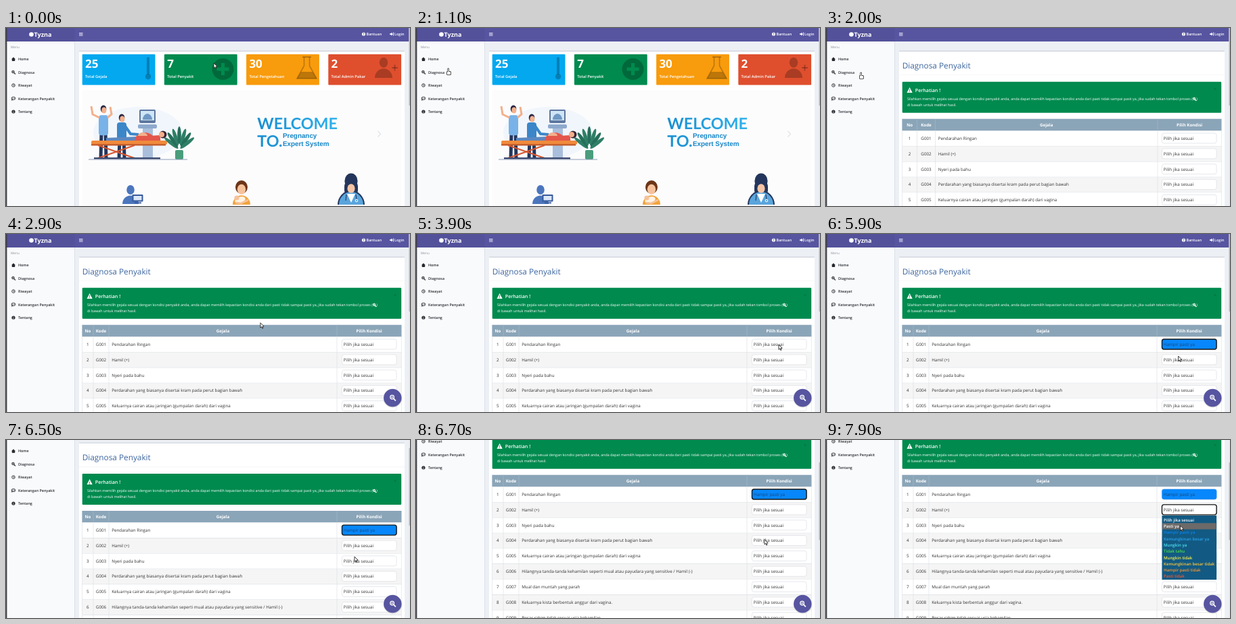
These frames come from a looping animation (597x264 px, 8 s). An HTML page with a canvas:

```html
<!DOCTYPE html>
<html lang="id">
<head>
<meta charset="utf-8">
<title>Diagnosa Penyakit</title>
<style>
  html, body { margin: 0; width: 597px; height: 264px; overflow: hidden; background: #ecf0f5; }
  canvas { display: block; }
</style>
</head>
<body>
<canvas id="stage" width="597" height="264"></canvas>
<script>
const ctx = document.getElementById('stage').getContext('2d');
const LOOP = 8000, STEP = 100;
const PURPLE = '#5755a0', GREEN = '#008a4e', SKIN = '#f3b08c', NAVY = '#24365c', BLUE = '#4b76bd';
const LEFT = 112.7, WIDTH = 471.5, RIGHT = LEFT + WIDTH, ROW = 22.85, OPTION = 9.3;

// moments of the story, in ms
const PAGE = 2000, SETTLED = 2200, OPEN_1 = 4200, PICK = 5600, SCROLL = 6200, SCROLLED = 6700, OPEN_2 = 7300;

const symptoms = [
  'Pendarahan Ringan', 'Hamil (+)', 'Nyeri pada bahu',
  'Perdarahan yang biasanya disertai kram pada perut bagian bawah',
  'Keluarnya cairan atau jaringan (gumpalan darah) dari vagina',
  'Hilangnya tanda-tanda kehamilan seperti mual atau payudara yang sensitive / Hamil (-)',
  'Mual dan muntah yang parah', 'Keluarnya kista berbentuk anggur dari vagina.',
  'Besar rahim tidak sesuai usia kehamilan'
];
const options = [
  ['Pilih jika sesuai', '#fff'], ['Pasti ya', '#a07af0'], ['Hampir pasti ya', '#0a84f0'],
  ['Kemungkinan besar ya', '#2ba3ec'], ['Mungkin ya', '#4fe3f2'], ['Tidak tahu', '#4ee04e'],
  ['Mungkin tidak', '#fff04a'], ['Kemungkinan besar tidak', '#ffc63a'],
  ['Hampir pasti tidak', '#ff952e'], ['Pasti tidak', '#f4562e']
];
// pointer moves: start, end, x, y
const moves = [
  [0, 1100, 47, 60], [1300, 1800, 51, 66], [2100, 3400, 536, 164], [OPEN_1, 5000, 532, 205],
  [5000, 5400, 531, 196], [PICK, 6100, 515, 173], [6500, SCROLLED, 515, 147.5],
  [SCROLLED, 7100, 520, 101], [OPEN_2, 7900, 523.5, 127]
];

const progress = (t, start, end) => Math.min(1, Math.max(0, (t - start) / (end - start)));
const smooth = p => p * p * (3 - 2 * p);
const scrollAt = t => 83 * progress(t, SCROLL, SCROLLED) ** 2;

function pointerAt(t) {
  let x = 307, y = 52;
  for (const [start, end, toX, toY] of moves) {
    const p = smooth(progress(t, start, end));
    x += (toX - x) * p;
    y += (toY - y) * p;
  }
  return [x, y];
}

function rect(x, y, w, h, fill, radius = 0) {
  ctx.fillStyle = fill;
  ctx.beginPath();
  ctx.roundRect(x, y, w, h, radius);
  ctx.fill();
}
function disc(x, y, r, fill, ry = r, tilt = 0) {
  ctx.fillStyle = fill;
  ctx.beginPath();
  ctx.ellipse(x, y, r, ry, tilt, 0, 7);
  ctx.fill();
}
function dome(x, base, rx, ry, fill) {
  ctx.fillStyle = fill;
  ctx.beginPath();
  ctx.ellipse(x, base, rx, ry, 0, Math.PI, 0);
  ctx.fill();
}
function ring(x, y, r, color, width) {
  ctx.strokeStyle = color;
  ctx.lineWidth = width;
  ctx.beginPath();
  ctx.arc(x, y, r, 0, 7);
  ctx.stroke();
}
function trace(points) {
  ctx.beginPath();
  for (let i = 0; i < points.length; i += 2) ctx.lineTo(points[i], points[i + 1]);
}
function poly(fill, ...points) {
  trace(points);
  ctx.fillStyle = fill;
  ctx.fill();
}
function line(color, width, ...points) {
  trace(points);
  ctx.strokeStyle = color;
  ctx.lineWidth = width;
  ctx.stroke();
}
function text(s, x, y, size, fill, weight = 400, align = 'left', family = '"Open Sans", sans-serif') {
  ctx.font = `${weight} ${size}px ${family}`;
  ctx.textAlign = align;
  ctx.fillStyle = fill;
  ctx.fillText(s, x, y);
}
function plus(x, y, r, color, width) {
  line(color, width, x - r, y, x + r, y);
  line(color, width, x, y - r, x, y + r);
}
function magnifier(x, y, r, color, width) {
  ring(x, y, r, color, width);
  line(color, width * 1.3, x + r * .75, y + r * .75, x + r * 1.9, y + r * 1.9);
  plus(x, y, r / 2, color, width * .7);
}
function bust(x, base, size, coat, skin) {
  dome(x, base, size, size * 1.05, coat);
  disc(x, base - size * 1.75, size * .48, skin, size * .58);
}

function header() {
  rect(0, 0, 597, 20, PURPLE);
  rect(0, 0, 101.5, 20, '#53519a');
  disc(37.5, 9.5, 3.3, '#fff');
  text('Tyzna', 41.5, 12.5, 9, '#fff', 700);
  for (let i = 0; i < 3; i++) rect(108, 7 + i * 1.8, 5.5, 1, '#dddcf0');
  disc(528.5, 9, 2.6, '#fff');
  text('?', 528.5, 10.8, 5, PURPLE, 700, 'center');
  text('Bantuan', 532.5, 11.2, 5.5, '#fff', 600);
  rect(567, 8.2, 3, 1.6, '#fff');
  poly('#fff', 569, 6.5, 571.6, 9, 569, 11.5);
  rect(571.8, 6.6, 1, 4.8, '#fff');
  text('Login', 574, 11.2, 5.5, '#fff', 600);
}

function sidebar() {
  rect(0, 20, 101.5, 400, '#f9fafc');
  rect(101, 20, .7, 400, '#d2d6de');
  text('Menu', 7, 30.2, 4.8, '#8a8f96');
  const ink = '#262a2e';
  ['Home', 'Diagnosa', 'Riwayat', 'Keterangan Penyakit', 'Tentang'].forEach((label, i) =>
    text(label, 18, 48 + i * 19.5, 5.4, ink, 600));
  poly(ink, 8, 46.3, 11, 43.3, 14, 46.3);
  rect(8.8, 46, 4.4, 3, ink);
  magnifier(10.5, 65, 1.8, ink, 1);
  ring(11, 85, 2.3, ink, .9);
  line(ink, .7, 11, 83.5, 11, 85.3, 12.2, 85.3);
  disc(11, 104.3, 3.1, ink, 2.5);
  poly(ink, 8.6, 105, 8.3, 108, 11, 106);
  disc(11, 104.3, 2.3, '#f9fafc', 1.7);
  for (let i = -1; i < 2; i++) disc(11 + i * 1.3, 104.3, .5, ink);
  disc(11, 124, 2.6, ink);
  text('i', 11, 125.8, 4.6, '#fff', 700, 'center');
}

function cards() {
  const shade = 'rgba(0,0,0,.24)';
  [['25', 'Total Gejala', '#03a8ef'], ['7', 'Total Penyakit', GREEN],
   ['30', 'Total Pengetahuan', '#f89b0c'], ['2', 'Total Admin Pakar', '#df4f2e']]
    .forEach(([count, label, color], i) => {
      const x = LEFT + i * 121.2;
      rect(x, 39, 107.8, 45.6, color, 1);
      text(count, x + 4.3, 58.9, 17, '#fff', 700);
      text(label, x + 4.3, 73.6, 5.75, '#fff', 600);
    });
  rect(208, 43, 4, 26, shade, 2);
  disc(210, 72, 4.2, shade);
  disc(320.5, 61, 16, shade);
  plus(320.5, 61, 9, GREEN, 5);
  rect(438, 42, 13, 2, shade);
  line(shade, 1.6, 440.5, 43, 440.5, 56, 430, 75, 459, 75, 448.5, 56, 448.5, 43);
  poly(shade, 436, 65, 453, 65, 459, 75, 430, 75);
  bust(558, 74, 13, shade, shade);
  plus(574.5, 59, 4.5, shade, 2);
}

function standing(x, top, height, shirt, trousers) {
  const hip = top + height * .5;
  line(trousers, 5, x - 3, hip, x - 4, top + height);
  line(trousers, 5, x + 3, hip, x + 4, top + height);
  rect(x - 7, top + height * .18, 14, height * .38, shirt, 4);
  disc(x, top + 5, 4.3, '#2b2745', 5.5);
  disc(x + .8, top + 7, 3.5, SKIN, 4.5);
}

function clinic() {
  disc(195, 155, 66, '#f1f6fc', 38);
  // examination machine
  rect(197, 121, 24, 20, '#5d779f', 2);
  rect(199, 123, 20, 14, '#cfe5f5');
  dome(209, 136, 7, 9, '#6f98c4');
  rect(195, 143, 28, 6, '#8ea9cd', 2);
  rect(202, 149, 15, 45, '#a9bedb');
  // visitor and doctor
  standing(144, 115, 79, '#78b2e8', NAVY);
  line(SKIN, 3, 138, 133, 128, 128, 126, 116);
  line(SKIN, 3, 150, 133, 156, 128, 154, 117);
  standing(171, 128, 66, '#3b86c8', NAVY);
  line('#3b86c8', 4, 175, 144, 184, 157, 196, 158);
  // patient
  line('#5c88c0', 6, 148, 166, 196, 164);
  dome(205, 168, 15, 13, '#e4574b');
  dome(202, 160, 7, 5, SKIN);
  line('#e4574b', 8, 210, 164, 228, 163);
  disc(232, 158, 5.5, '#3a2335');
  disc(230, 158, 4, SKIN);
  // bed
  rect(126, 167, 112, 6, '#f08a3c', 2);
  rect(126, 172, 110, 2.4, '#c55f2c');
  line('#d8562f', 2, 136, 174, 190, 193);
  line('#d8562f', 2, 190, 174, 136, 193);
  rect(130, 192, 98, 2.5, '#38486e');
  // plant
  for (let i = -3; i <= 3; i++) {
    const a = i * .3, reach = 21 - Math.abs(i) * 2;
    disc(256 + reach * Math.sin(a), 180 - reach * Math.cos(a), 2.8, i % 2 ? '#2e7f66' : '#256e5a', 13, a);
  }
  rect(250, 181, 12, 14, '#4a9d7c', 2);
  rect(122, 194.6, 146, .8, '#8f9bb5');
}

function roleIcons() {
  const base = 262;
  // administrator with screen
  bust(184, base - 1, 12, BLUE, BLUE);
  rect(186.5, 247, 16, 10.5, '#35599c', 1);
  rect(188.5, 249, 12, 6.5, '#dbe7f8');
  rect(190, 258.5, 10, 1.8, '#35599c');
  // mother and child
  disc(348, 236, 9, '#6c3518', 10);
  bust(348, base, 13, '#f2a33a', '#f6c29b');
  disc(346, 255, 8, '#fff4e4', 4.5, -.3);
  disc(341, 252, 3.6, '#f6c29b');
  line('#f6c29b', 3, 358, 255, 347, 260, 339, 259);
  // doctor with stethoscope
  rect(500, 226, 20, 24, NAVY, 9);
  bust(510, base, 20, NAVY, NAVY);
  bust(510, base, 18, '#5aa5dc', NAVY);
  disc(510, 238, 5.6, '#f4c4a4', 6.8);
  poly('#fff', 504, 246, 516, 246, 510, 259);
  line(NAVY, 1.1, 503, 247, 502, 256);
  line(NAVY, 1.1, 517, 247, 518, 254);
  ring(518, 256, 1.8, '#fff', 1);
}

function home() {
  cards();
  rect(LEFT, 92, WIDTH, 172, '#fcfcfd');
  clinic();
  const sky = ctx.createLinearGradient(372, 0, 488, 0);
  sky.addColorStop(0, '#1b8fd0');
  sky.addColorStop(1, '#2fb0ea');
  const slogan = (s, x, y, size, fill, family) => text(s, x, y, size, fill, 700, 'left', family);
  slogan('WELCOME', 371.3, 149.8, 23.3, sky, 'Lato, sans-serif');
  slogan('TO.', 371.3, 176.3, 23.3, sky, 'Lato, sans-serif');
  slogan('Pregnancy', 409, 163, 9.85, '#1787c8', '"Liberation Sans", sans-serif');
  slogan('Expert System', 409, 174.7, 9.85, '#1787c8', '"Liberation Sans", sans-serif');
  line('#dfe3e8', 1.2, 549.5, 153, 553.5, 157.3, 549.5, 161.5);
  roleIcons();
}

const rowCenter = i => 163.5 + i * ROW;

function selectBox(i, chosen, focused) {
  const y = rowCenter(i);
  rect(496.5, y - 7.5, 80.6, 15, chosen ? '#0787fb' : '#fff', 3);
  ctx.strokeStyle = focused ? '#151515' : chosen ? '#3a91e4' : '#dcdfe4';
  ctx.lineWidth = focused ? 1.4 : .7;
  ctx.stroke();
  text(chosen ? 'Hampir pasti ya' : 'Pilih jika sesuai', 498.8, y + 2.3, 6.3, chosen ? '#1c4672' : '#333');
}

function notice() {
  rect(LEFT, 79.8, WIDTH, 46, GREEN, 1.2);
  poly('#fff', 119.5, 96, 123.6, 88, 127.7, 96);
  text('!', 123.6, 95.4, 6, GREEN, 700, 'center');
  text('Perhatian !', 131.8, 95, 7.1, '#fff', 600);
  text('×', 575, 92.5, 7, '#007340', 700, 'center');
  const advice = 'Silahkan memilih gejala sesuai dengan kondisi penyakit anda, anda dapat memilih kepastian ' +
    'kondisi anda dari pasti tidak sampai pasti ya, jika sudah tekan tombol proses (';
  text(advice, 120, 107.3, 5.32, '#fff');
  const end = 120 + ctx.measureText(advice).width;
  magnifier(end + 2.3, 104.8, 1.7, '#fff', 1);
  text(')', end + 5.4, 107.3, 5.32, '#fff');
  text('di bawah untuk melihat hasil.', 120, 116.3, 5.32, '#fff');
}

function diagnosis(t) {
  text('Diagnosa Penyakit', LEFT, 59.8, 11.8, '#3c659f');
  rect(108, 69.5, 481, .6, '#f0f1f3');
  notice();

  const inner = t < SETTLED ? [134.5, 161.5, 490] : [129, 152, 489];
  const columns = [LEFT, ...inner, RIGHT];
  const middle = i => (columns[i] + columns[i + 1]) / 2;
  rect(LEFT, 134.8, WIDTH, 17.3, '#8ba5b8');
  ['No', 'Kode', 'Gejala', 'Pilih Kondisi'].forEach((label, i) =>
    text(label, middle(i), 145.8, 6.2, '#fff', 700, 'center'));
  const focus = t < OPEN_1 ? -1 : t < OPEN_2 ? 0 : 1;
  symptoms.forEach((symptom, i) => {
    const y = rowCenter(i);
    rect(LEFT, y - ROW / 2, WIDTH, ROW, i % 2 ? '#f5f5f5' : '#fff');
    rect(LEFT, y - ROW / 2, WIDTH, .6, '#dde1e6');
    text(i + 1, middle(0), y + 2.3, 6.25, '#333', 400, 'center');
    text('G00' + (i + 1), middle(1), y + 2.3, 6.25, '#333', 400, 'center');
    text(symptom, columns[2] + 4.2, y + 2.3, 6.25, '#333');
    selectBox(i, i === 0 && t >= PICK, i === focus);
  });
  columns.forEach(x => {
    rect(x - .3, 134.8, .6, 17.3, '#a3b8c8');
    rect(x - .3, 152, .6, 220, '#d9dde3');
  });
}

function actionButton() {
  disc(571.4, 244, 13.6, 'rgba(0,0,0,.14)');
  disc(571.3, 243, 13.2, PURPLE);
  magnifier(570.6, 242, 2.8, '#fff', 1.3);
}

function dropdown(center, pointerY) {
  const top = center + 10.5;
  rect(496.5, center + 8.6, 80.6, OPTION * options.length + 2.2, '#125a83');
  const hover = Math.floor((pointerY - top) / OPTION);
  options.forEach(([label, color], i) => {
    const y = top + i * OPTION;
    if (i === hover) rect(497, y, 79.6, OPTION, '#6d6a69');
    text(label, 499, y + 6.9, 6.1, i === hover ? '#fff' : color, 600);
  });
}

function pointer(x, y, hand) {
  ctx.save();
  ctx.translate(x, y);
  if (hand) {
    rect(-2, 4, 7, 6, '#222', 2);
    rect(-.6, -.5, 2.5, 7, '#222', 1.2);
    rect(-1.2, 4.7, 5.4, 4.5, '#fff', 1.5);
    rect(.1, .3, 1.1, 6, '#fff', .5);
  } else {
    trace([0, 0, 0, 7.4, 1.7, 5.9, 2.9, 8.5, 4, 8, 2.9, 5.5, 5.2, 5.3]);
    ctx.closePath();
    ctx.fillStyle = '#fff';
    ctx.strokeStyle = '#222';
    ctx.lineWidth = .9;
    ctx.fill();
    ctx.stroke();
  }
  ctx.restore();
}

function draw(t) {
  const [x, y] = pointerAt(t), scroll = scrollAt(t);
  rect(0, 0, 597, 264, '#ecf0f5');
  ctx.save();
  ctx.translate(0, -scroll);
  header();
  sidebar();
  rect(108, 33.8, 481, 330, '#fff', 1);
  rect(108, 33.6, 481, 1.4, '#d2d6de', .7);
  if (t < PAGE) home(); else diagnosis(t);
  ctx.restore();
  if (t >= SETTLED) actionButton();
  if (t >= OPEN_1 && t < PICK) dropdown(rowCenter(0), y);
  if (t >= OPEN_2) dropdown(rowCenter(1) - scroll, y);
  rect(595.4, 0, 1.6, 264, '#e6e8eb');
  rect(595.6, scroll * .4, 1.4, 115, '#b4b8be');
  rect(0, 0, 1.4, 264, '#3a3a3e');
  pointer(x, y, x < 101 && y > 56 && y < 75);
}

function frame(now) {
  ctx.textRendering = 'geometricPrecision';
  draw(Math.floor((now % LOOP) / STEP) * STEP);
  requestAnimationFrame(frame);
}
requestAnimationFrame(frame);
</script>
</body>
</html>
```
